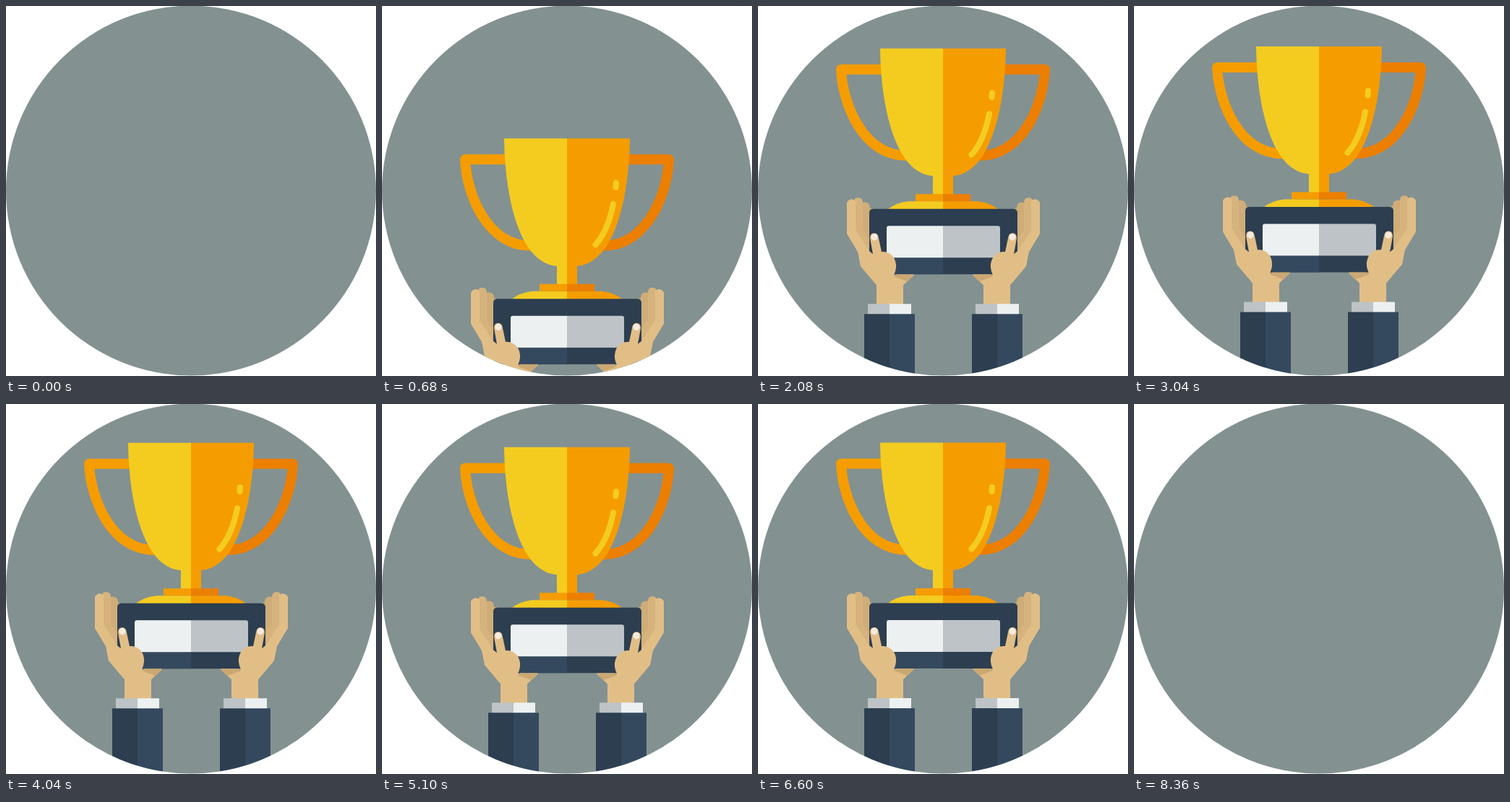
An HTML page for the animation above (9.02 s loop, 512x512 px).

```html
<!DOCTYPE html>
<html lang="en">
<head>
<meta charset="utf-8">
<title>Raised trophy</title>
<style>
  html, body { margin: 0; width: 100%; height: 100%; overflow: hidden; background: #fff; }
  svg { display: block; width: 100%; height: 100%; }
</style>
</head>
<body>
<svg viewBox="0 0 512 512">
  <defs>
    <clipPath id="disc"><circle cx="256" cy="255.5" r="256"/></clipPath>
    <path id="handle" d="M176 82.5H115C117 130 145 202 206 202" fill="none" stroke-width="14" stroke-linejoin="round"/>
    <path id="bowl" d="M169 53.5H256V256H242V230C190 226 170 135 169 53.5Z"/>
    <path id="dome" d="M179 276.5Q190 267 208 265H256V276.5Z"/>
    <g id="fingers">
      <path fill="#c6a470" d="M146 276Q152 272 160 276V335H150Z"/>
      <path fill="#cfad78" d="M141 269Q145 265 151 267Q155 268 155 275V335H146Z"/>
      <path fill="#d6b37d" d="M133 264Q134 259.500 139 260Q145 260 145 267V304L157 322V342L133 308Z"/>
    </g>
    <g id="hand">
      <path fill="#e2be87" d="M123 267Q124 263 130 262L135 264V305L154 334L159 338L155 316Q155 309 161 309Q166 309 167 316L171 335Q181 334 188 343Q193 352 190 362L188 367H216L201 381V408H164V381L142 355L138 335L123 310Z"/>
      <path fill="#cba873" d="M188 369L191 366H216L207 376Z"/>
      <ellipse cx="161" cy="314.500" rx="4.500" ry="4.800" fill="#f5ebdf"/>
    </g>
    <g id="sleeve">
      <path fill="#bdc3c7" d="M152 407H182V421.500H152Z"/>
      <path fill="#ecf0f1" d="M182 407H212V421.500H182Z"/>
      <path fill="#2c3e50" d="M147 421H182V520H147Z"/>
      <path fill="#34495e" d="M182 421H217V520H182Z"/>
    </g>
  </defs>

  <circle cx="256" cy="255.5" r="256" fill="#839191"/>
  <g clip-path="url(#disc)">
    <g id="trophy">
      <use href="#handle" stroke="#f59d00"/>
      <use href="#handle" stroke="#ec7f00" transform="matrix(-1 0 0 1 512 0)"/>
      <use href="#bowl" fill="#f4cc20"/>
      <use href="#bowl" fill="#f59d00" transform="matrix(-1 0 0 1 512 0)"/>
      <path d="M320 144Q313 181 295.500 200.500M324 115L323.500 121" fill="none" stroke="#f4cc20" stroke-width="8" stroke-linecap="round"/>
      <use href="#dome" fill="#f4cc20"/>
      <use href="#dome" fill="#f59d00" transform="matrix(-1 0 0 1 512 0)"/>
      <path fill="#f59d00" d="M218 255H256V265H218Z"/>
      <path fill="#ec7f00" d="M256 255H294V265H256Z"/>

      <use href="#fingers"/>
      <use href="#fingers" transform="matrix(-1 0 0 1 513 0)"/>
      <path fill="#2c3e50" d="M154 366V281Q154 275.500 160 275.500H353Q359 275.500 359 281V366Z"/>
      <path fill="#34495e" d="M160 343H256V366H160Z"/>
      <path fill="#ecf0f1" d="M178 343V302Q178 299 181 299H256V343Z"/>
      <path fill="#bdc3c7" d="M256 299H332Q335 299 335 302V343H256Z"/>
      <use href="#hand"/>
      <use href="#hand" transform="matrix(-1 0 0 1 513 0)"/>
      <use href="#sleeve"/>
      <use href="#sleeve" x="149"/>
    </g>
  </g>
</svg>
<script>
  const LOOP = 9020, HIDDEN = 460;
  const ENTER = 130, ARRIVED = 1700, LEAVE = 7800, GONE = 8360;
  const trophy = document.getElementById('trophy');

  // Gentle sway while held up: [time, drop below the highest position]
  const sway = [[ARRIVED, 0], [2200, 6], [2780, 0], [3370, 6], [3960, 0], [4720, 6], [5640, 6.6], [6600, 0], [LEAVE, 0]];

  function swayAt(t) {
    const i = sway.findIndex(([time]) => time >= t);
    if (i < 1) return 0;
    const [t0, y0] = sway[i - 1], [t1, y1] = sway[i];
    return y0 + (y1 - y0) * (1 - Math.cos(Math.PI * (t - t0) / (t1 - t0))) / 2;
  }

  function dropAt(t) {
    if (t < ENTER || t >= GONE) return HIDDEN;
    if (t < ARRIVED) {
      const left = (ARRIVED - t) / (ARRIVED - ENTER);
      return HIDDEN * (0.43 * left ** 2 + 0.57 * left ** 4);
    }
    if (t < LEAVE) return swayAt(t);
    return HIDDEN * ((t - LEAVE) / (GONE - LEAVE)) ** 2;
  }

  function draw() {
    const t = performance.now() % LOOP;
    trophy.setAttribute('transform', `translate(0 ${dropAt(t).toFixed(2)})`);
    requestAnimationFrame(draw);
  }
  draw();
</script>
</body>
</html>
```
